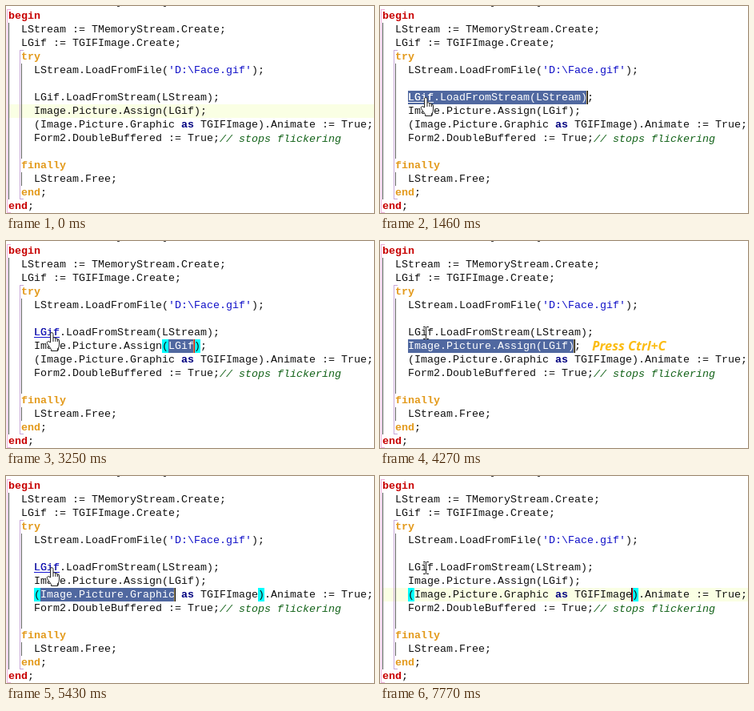
An HTML page with a canvas that plays this animation: 460 px wide and 259 px high, repeating every 8000 ms.

```html
<!DOCTYPE html>
<html lang="en">
<head>
<meta charset="utf-8">
<title>Expanding a selection in a code editor</title>
<style>
html, body { margin: 0; width: 100%; height: 100%; overflow: hidden; background: #fff; }
canvas { display: block; }
</style>
</head>
<body>
<canvas id="stage" width="460" height="259"></canvas>
<script>
const ctx = document.getElementById('stage').getContext('2d');
const LOOP = 8000, CELL = 8, ROW = 17, LEFT = 3, TOP = 4;

const lines = [
  'begin',
  '  LStream := TMemoryStream.Create;',
  '  LGif := TGIFImage.Create;',
  '  try',
  "    LStream.LoadFromFile('D:\\Face.gif');",
  '',
  '    LGif.LoadFromStream(LStream);',
  '    Image.Picture.Assign(LGif);',
  '    (Image.Picture.Graphic as TGIFImage).Animate := True;',
  '    Form2.DoubleBuffered := True;// stops flickering',
  '',
  '  finally',
  '    LStream.Free;',
  '  end;',
  'end;'
];

const MONO = '13.333px "Liberation Mono", "Courier New", monospace';
const inks = { plain: '#101010', outer: '#c80000', inner: '#e39a1c', word: '#000080', text: '#1010c8', note: '#126218' };
const tokenRule = /\/\/.*|'[^']*'|\b(?:begin|end|try|finally|as)\b/g;

// Places are [row, column]; ranges are [row, from, to).
const LGIF = [[2, 2, 6], [6, 4, 8], [7, 25, 29]];
const TGIF = [[2, 10, 19]];
const PARENS_7 = [[7, 24], [7, 29]];
const PARENS_8 = [[8, 4], [8, 39]];

// Each step changes part of the editor state and keeps the rest.
const steps = [
  [0, { row: 7, caret: null, sel: null, marks: [], parens: [], mouse: null, hand: false, label: null }],
  [220, { mouse: [137, 141] }],
  [300, { mouse: [71, 110] }],
  [530, { mouse: [65, 112] }],
  [605, { mouse: [60, 114] }],
  [680, { mouse: [58, 115] }],
  [910, { row: 6, caret: [6, 7] }],
  [1000, { marks: LGIF }],
  [1230, { row: null, marks: [], sel: [6, 4, 8], caret: [6, 8], hand: true }],
  [1460, { sel: [6, 4, 32], caret: [6, 32] }],
  [1780, { label: [271, 120] }],
  [2480, { row: 7, sel: null, caret: null, hand: false, label: null }],
  [2555, { caret: [7, 30] }],
  [2630, { caret: [7, 29], parens: PARENS_7 }],
  [3030, { marks: LGIF }],
  [3107, { hand: true }],
  [3183, { row: null, marks: [], sel: [7, 25, 29] }],
  [3337, { sel: [7, 18, 30], caret: [7, 30], parens: [] }],
  [3490, { sel: [7, 4, 30] }],
  [3720, { label: [265, 137] }],
  [4270, { hand: false }],
  [4430, { row: 8, sel: null, caret: [8, 30], label: null, parens: PARENS_8 }],
  [4500, { caret: [8, 29] }],
  [4960, { caret: [8, 28] }],
  [5040, { caret: [8, 27] }],
  [5120, { caret: [8, 26] }],
  [5200, { hand: true }],
  [5280, { row: null, sel: [8, 19, 26] }],
  [5430, { sel: [8, 5, 26] }],
  [5660, { sel: [8, 5, 39], caret: [8, 39] }],
  [5750, { sel: [8, 4, 40], caret: [8, 40], parens: [] }],
  [6210, { marks: TGIF }],
  [6760, { marks: [], label: [265, 137] }],
  [7540, { hand: false }],
  [7770, { row: 8, sel: null, caret: [8, 39], parens: PARENS_8, label: null }]
];

const stateAt = time => Object.assign({}, ...steps.filter(s => s[0] <= time).map(s => s[1]));
const xOf = col => LEFT + col * CELL;
const yOf = row => TOP + row * ROW;

function box(color, x, y, w, h) {
  ctx.fillStyle = color;
  ctx.fillRect(x, y, w, h);
}

function cells(color, [row, from, to = from + 1]) {
  box(color, xOf(from), yOf(row), (to - from) * CELL, ROW);
}

function drawRun(text, row, col, kind, color) {
  const style = kind === 'note' ? 'italic ' : ['outer', 'inner', 'word'].includes(kind) ? 'bold ' : '';
  ctx.font = style + MONO;
  ctx.fillStyle = color || inks[kind];
  ctx.fillText(text, xOf(col), yOf(row) + (kind === 'note' ? 13 : 12));
}

function drawLine(row, color) {
  const line = lines[row];
  let col = 0;
  for (const match of line.matchAll(tokenRule)) {
    const word = match[0];
    const kind = word.startsWith('/') ? 'note' : word.startsWith("'") ? 'text'
      : word === 'as' ? 'word' : match.index ? 'inner' : 'outer';
    drawRun(line.slice(col, match.index), row, col, 'plain', color);
    drawRun(word, row, match.index, kind, color);
    col = match.index + word.length;
  }
  drawRun(line.slice(col), row, col, 'plain', color);
}

function drawBracket(color, x, top, bottom) {
  box(color, x, top, 1, bottom - top);
  box(color, x, top, 5, 1);
  box(color, x, bottom - 1, 5, 1);
}

function drawBlocks() {
  drawBracket('#eeb0dc', 1, 4, 259);
  drawBracket('#c8a8d8', 17, 55, 242);
  box('#555', 3, 21, 1, 221);
  box('#666', 19, 72, 1, 119);
  box('#666', 19, 208, 1, 17);
  box('#444', 139, 0, 3, 1);
  box('#444', 197, 0, 3, 1);
}

function drawSelection(sel) {
  const [row, from, to] = sel;
  cells('#5068a0', sel);
  ctx.save();
  ctx.beginPath();
  ctx.rect(xOf(from), yOf(row), (to - from) * CELL, ROW);
  ctx.clip();
  drawLine(row, '#fff');
  ctx.restore();
}

function drawLink(selected) {
  const color = selected ? '#fff' : '#1414d0';
  drawRun('LGif', 6, 4, 'plain', color);
  box(color, xOf(4), yOf(6) + 14, 4 * CELL, 1);
}

function drawLabel([x, y]) {
  ctx.font = 'italic bold 16.4px "Open Sans", "Noto Sans", sans-serif';
  ctx.fillStyle = '#fbbc14';
  ctx.fillText('Press Ctrl+C', x, y);
}

function drawIBeam([x, y]) {
  box('#222', x - 1, y - 7, 1, 14);
  for (const edge of [y - 8, y + 7]) {
    box('#222', x - 4, edge, 3, 1);
    box('#222', x, edge, 3, 1);
  }
}

const handShape = new Path2D('M55.5 127V116.5Q55.5 114.5 57.2 114.5T59 116.5V121Q61 120 62 122' +
  'Q64 121 64.5 123Q66.5 122.5 66.5 125V130Q66.5 133 64.5 135V137.5H56.5V135.5L51.5 128.5' +
  'Q50.5 126 52.5 125.5Q54 125.5 55.5 127Z');
const fingers = new Path2D('M59 121V126M62 122V126M64.5 123V126');

function drawHand() {
  ctx.fillStyle = '#fff';
  ctx.strokeStyle = '#222';
  ctx.lineWidth = 1;
  ctx.fill(handShape);
  ctx.stroke(handShape);
  ctx.stroke(fingers);
}

function drawCaret([row, col]) {
  ctx.globalCompositeOperation = 'difference';
  box('#fff', xOf(col) - 1, yOf(row), 2, ROW);
  ctx.globalCompositeOperation = 'source-over';
}

function draw(time) {
  const s = stateAt(time);
  box('#fff', 0, 0, 460, 259);
  if (s.row !== null) box('#faffe4', 4, yOf(s.row), 456, ROW);
  drawBlocks();
  s.marks.forEach(mark => cells('#ffdd80', mark));
  s.parens.forEach(place => cells('#00ffff', place));
  lines.forEach((_, row) => drawLine(row));
  if (s.sel) drawSelection(s.sel);
  if (s.hand) drawLink(s.sel && s.sel[0] === 6);
  if (s.caret) drawCaret(s.caret);
  if (s.label) drawLabel(s.label);
  if (s.hand) drawHand();
  else if (s.mouse) drawIBeam(s.mouse);
}

const start = performance.now();
function tick() {
  draw((performance.now() - start) % LOOP);
  requestAnimationFrame(tick);
}
tick();
</script>
</body>
</html>
```
